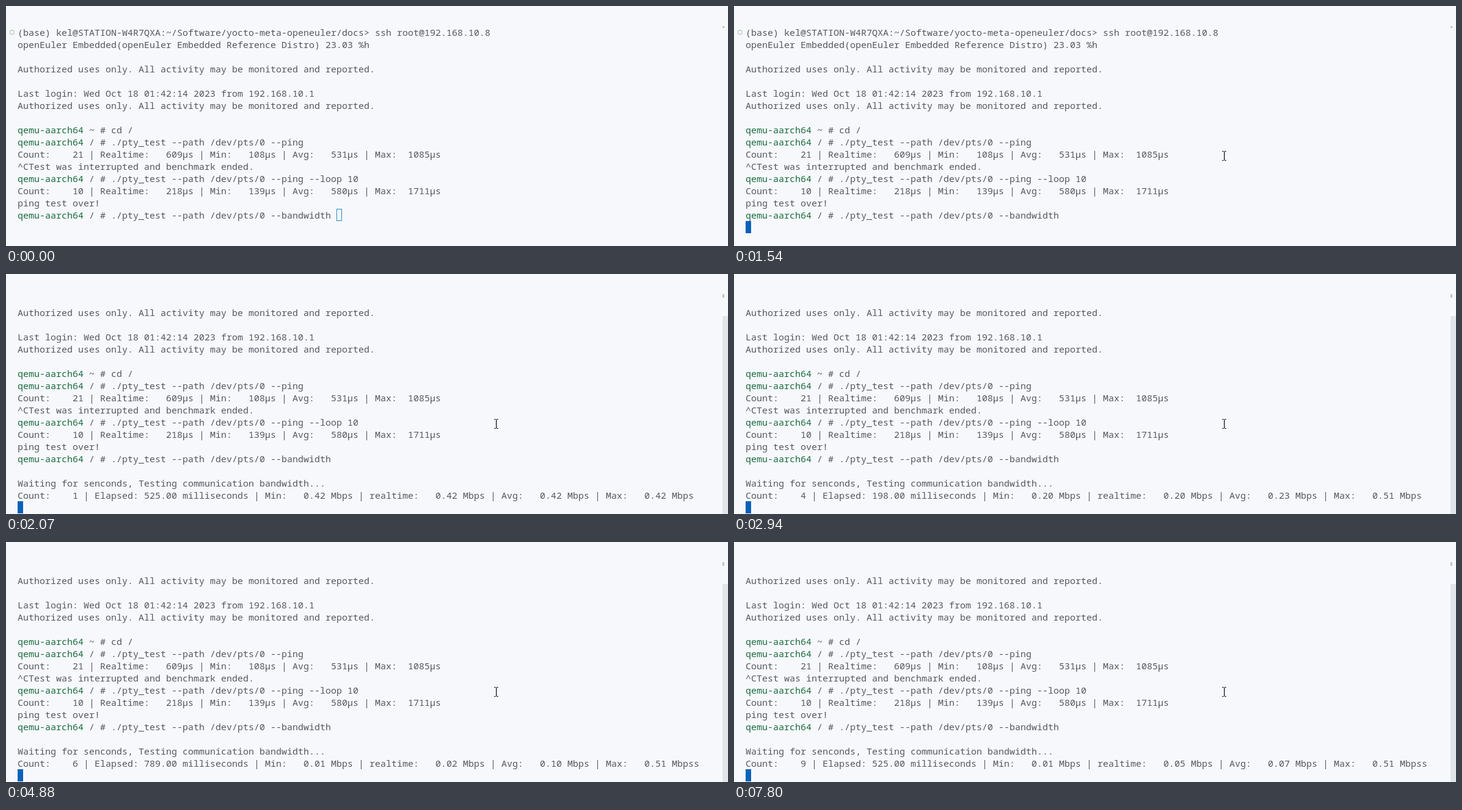
An HTML page with a canvas for the animation above (8000 ms loop, 1182 by 394 pixels).

```html
<!DOCTYPE html>
<html lang="en">
<head>
<meta charset="utf-8">
<title>Terminal</title>
<style>
html, body { margin: 0; width: 100%; height: 100%; overflow: hidden; background: #f6f8fc; }
canvas { display: block; width: 1182px; height: 394px; }
</style>
</head>
<body>
<canvas id="stage"></canvas>
<script>
const W = 1182, H = 394, LOOP = 8000;
const LEFT = 19, TOP = 33, CELL = 9, ROW = 20;
const INK = '#55585f', GREEN = '#1b6b3d', BLUE = '#0a62b8';
const HOST = 'qemu-aarch64';

const canvas = document.getElementById('stage');
const ctx = canvas.getContext('2d');
const ratio = window.devicePixelRatio || 1;
canvas.width = W * ratio;
canvas.height = H * ratio;

const ping = (count, now, min, avg, max) =>
  `Count:    ${count} | Realtime:   ${now}µs | Min:   ${min}µs | Avg:   ${avg}µs | Max:  ${max}µs`;
const notice = 'Authorized uses only. All activity may be monitored and reported.';
const run = HOST + ' / # ./pty_test --path /dev/pts/0 ';

const lines = [
  '(base) kel@STATION-W4R7QXA:~/Software/yocto-meta-openeuler/docs> ssh root@192.168.10.8',
  'openEuler Embedded(openEuler Embedded Reference Distro) 23.03 %h',
  '',
  notice,
  '',
  'Last login: Wed Oct 18 01:42:14 2023 from 192.168.10.1',
  notice,
  '',
  HOST + ' ~ # cd /',
  run + '--ping',
  ping(21, 609, 108, 531, 1085),
  '^CTest was interrupted and benchmark ended.',
  run + '--ping --loop 10',
  ping(10, 218, 139, 580, 1711),
  'ping test over!',
  run + '--bandwidth ',
  '',
  'Waiting for senconds, Testing communication bandwidth...'
];

// time, count, elapsed, min, realtime, avg, max
const samples = [
  [2070, 1, 525, .42, .42, .42, .42],
  [2740, 3, 232, .42, .51, .44, .51],
  [2940, 4, 198, .20, .20, .23, .51],
  [4080, 5, 1121, .01, .01, .12, .51],
  [4880, 6, 789, .01, .02, .10, .51],
  [6480, 7, 1584, .01, .03, .08, .51],
  [7270, 8, 785, .01, .04, .07, .51],
  [7800, 9, 525, .01, .05, .07, .51]
];

// A shorter report leaves the tail of the longer one behind it.
function report(t) {
  let shown = '';
  for (const [at, count, elapsed, ...rates] of samples) {
    if (t < at) break;
    const [min, now, avg, max] = rates.map(r => r.toFixed(2) + ' Mbps');
    const text = `Count:    ${count} | Elapsed: ${elapsed.toFixed(2)} milliseconds` +
      ` | Min:   ${min} | realtime:   ${now} | Avg:   ${avg} | Max:   ${max}`;
    shown = text + shown.slice(text.length);
  }
  return shown;
}

function box(x, y, w, h, color) {
  ctx.fillStyle = color;
  ctx.fillRect(x, y, w, h);
}

function write(text, row) {
  const y = TOP + row * ROW + 16;
  let x = LEFT;
  if (text.startsWith(HOST)) {
    ctx.fillStyle = GREEN;
    ctx.fillText(HOST, x, y);
    x += HOST.length * CELL;
    text = text.slice(HOST.length);
  }
  ctx.fillStyle = INK;
  ctx.fillText(text, x, y);
}

function caret(col, row, focused) {
  const x = LEFT + col * CELL, y = TOP + row * ROW;
  if (focused) {
    box(x, y, CELL, ROW, BLUE);
  } else {
    ctx.strokeStyle = '#2f8ac6';
    ctx.lineWidth = 1;
    ctx.strokeRect(x + .5, y + .5, CELL - 1, ROW - 1);
  }
}

function pointer(t) {
  if (t < 70) return;
  let x = 802, y = 246;
  if (t < 470) {
    const p = Math.floor((t - 70) / 66.7) / 5;
    const e = 1 - (1 - Math.min(p, 1)) ** 2;
    x = Math.round(1111 + (806 - 1111) * e);
    y = Math.round(374 + (241 - 374) * e);
  }
  const beam = (grow, color) => {
    const g = grow * 2;
    box(x - grow, y - 7 - grow, 1.4 + g, 14 + g, color);
    for (const edge of [y - 8, y + 7]) {
      box(x - 3 - grow, edge - grow, 3 + g, 1 + g, color);
      box(x + 1 - grow, edge - grow, 3 + g, 1 + g, color);
    }
  };
  beam(.7, '#fbfcfe');
  beam(0, '#202124');
}

function draw(t) {
  ctx.setTransform(ratio, 0, 0, ratio, 0, 0);
  ctx.font = '15px "Noto Sans Mono", "DejaVu Sans Mono", monospace';
  ctx.textBaseline = 'alphabetic';
  box(0, 0, W, H, '#f6f8fc');

  const scroll = t < 1610 ? 0 : t < 2070 ? 1 : 2;
  const last = t < 1610 ? 15 : 17;
  for (let i = scroll; i <= last; i++) write(lines[i], i - scroll);
  if (scroll === 2) write(report(t), 16);

  if (t < 1540) caret(lines[15].length, 15, t >= 470);
  else caret(0, scroll ? 17 : 16, true);

  if (scroll) {
    const thumb = scroll === 1 ? 52 : 69;
    box(1173, thumb, 9, H - thumb, '#e2e5ea');
    box(1173, 33, 3, 6, '#b9c8d0');
  } else {
    box(1173, 33, 3, 3, '#bcc3ca');
    ctx.strokeStyle = '#a9cfaa';
    ctx.lineWidth = 1.2;
    ctx.beginPath();
    ctx.arc(10, 43.3, 3.4, 0, Math.PI * 2);
    ctx.stroke();
  }
  pointer(t);
}

const start = performance.now();
function tick() {
  draw((performance.now() - start) % LOOP);
  requestAnimationFrame(tick);
}
tick();
</script>
</body>
</html>
```
